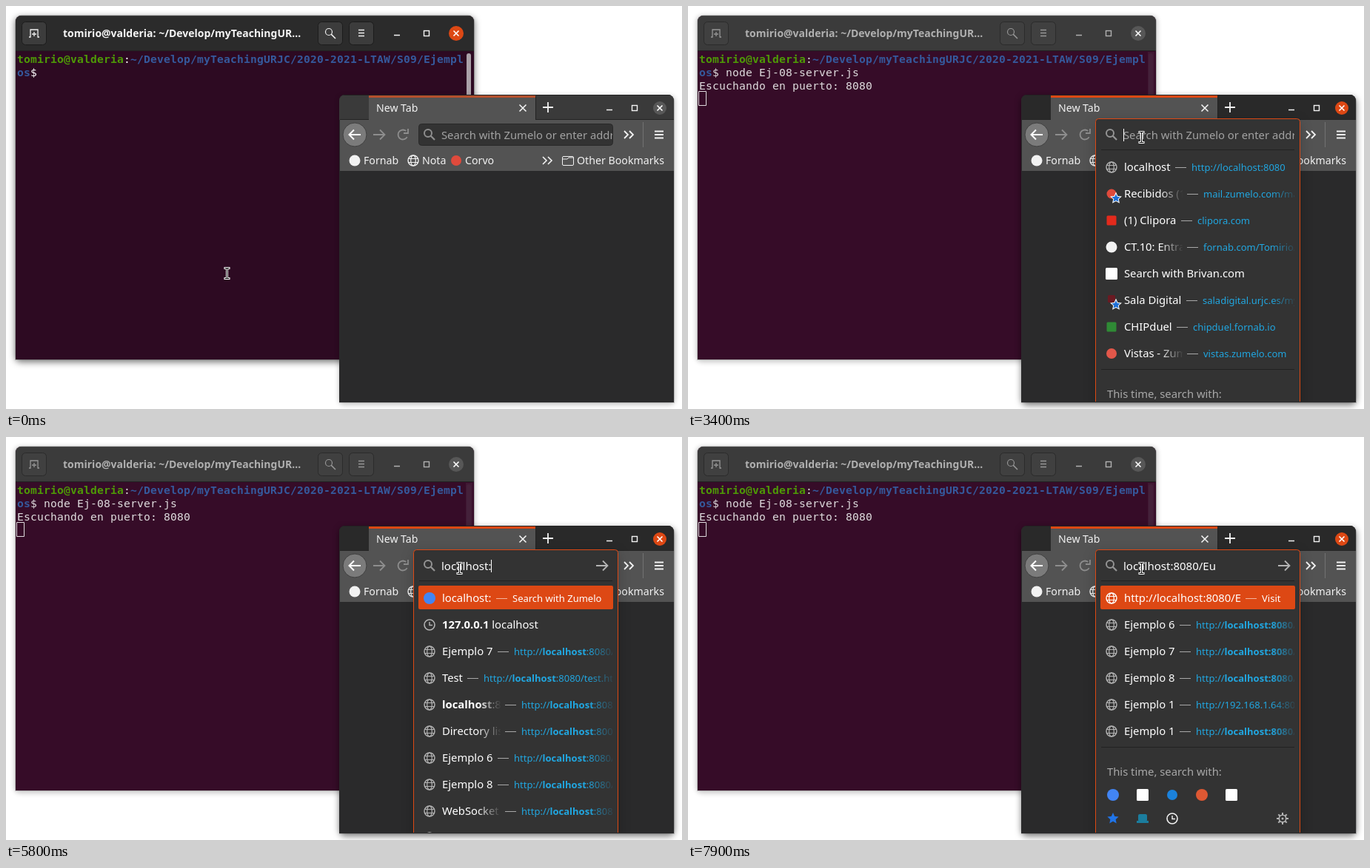
Recreate the animation shown at these times as an HTML page with a canvas. Size 913 by 545 pixels, loop 8000 ms.

```html
<!DOCTYPE html>
<html lang="en">
<head>
<meta charset="utf-8">
<title>Local server demo</title>
<style>
html, body { margin: 0; width: 100%; height: 100%; overflow: hidden; background: #fff; }
canvas { display: block; width: 913px; height: 545px; }
</style>
</head>
<body>
<canvas id="stage" width="913" height="545"></canvas>
<script>
const ctx = document.getElementById('stage').getContext('2d');
const LOOP = 8000, TAU = Math.PI * 2;
const ORANGE = '#dd4814', PANEL = '#333333', GREY = '#a8a8a8', BLUE = '#20a6e0';
const SANS = '"Noto Sans", "Open Sans", sans-serif';
const MONO = '"DejaVu Sans Mono", monospace';

// Last entry of a [time, ...] list that has started
const at = (list, t) => list.filter(e => e[0] <= t).pop();

function mix(a, b, k) {
  const ch = (c, i) => parseInt(c.substr(1 + 2 * i, 2), 16);
  return '#' + [0, 1, 2].map(i =>
    Math.round(ch(a, i) + (ch(b, i) - ch(a, i)) * k).toString(16).padStart(2, '0')).join('');
}

// ---------- script ----------
const TYPED = [[0, ''], [4000, 'l'], [4200, 'lo'], [4300, 'loc'], [4500, 'loca'], [4600, 'local'],
  [4700, 'localh'], [4800, 'localho'], [5200, 'localhos'], [5300, 'localhost'], [5700, 'localhost:'],
  [6100, 'localhost:8'], [6200, 'localhost:80'], [6600, 'localhost:808'], [6700, 'localhost:8080'],
  [6800, 'localhost:8080/'], [7400, 'localhost:8080/E'], [7900, 'localhost:8080/Eu']];

const HOST = 'http://localhost:8080/';
const TOP = ['globe|localhost|http://localhost:8080', 'mail|Recibidos (12)|mail.zumelo.com/mail',
  'video|(1) Clipora|clipora.com', 'code|CT.10: Entrada|fornab.com/Tomirio/CT',
  'shop|Search with Brivan.com', 'school|Sala Digital|saladigital.urjc.es/my',
  'chip|CHIPduel|chipduel.fornab.io', 'photo|Vistas - Zumelo|vistas.zumelo.com'];
const LOCAL = ['clock|127.0.0.1 localhost', 'find|localizador pedidos',
  'find|localidades confinadas en madrid', 'find|localizar movil', 'find|localidad',
  'find|locales en alquiler madrid', 'globe|Ejemplo 7|' + HOST + 'Ejemplo',
  'globe|Test|' + HOST + 'test.html', 'globe|Ejemplo 6|' + HOST];
const VISITED = ['clock|127.0.0.1 localhost', 'globe|Ejemplo 7|' + HOST + 'E',
  'globe|Test|' + HOST + 'test.html', 'globe|localhost:8080|' + HOST,
  'globe|Directory listing|http://localhost:8000/', 'globe|Ejemplo 6|' + HOST + 'E',
  'globe|Ejemplo 8|' + HOST + 'E', 'globe|WebSocket test|' + HOST, 'globe|Ejemplo 1|' + HOST];
const finds = words => words.split(',').map(w => 'find|localhost ' + w)
  .concat('globe|localhost:8080|' + HOST, 'globe|Test|' + HOST + 'test.html', 'globe|Ejemplo 7|' + HOST);
const EXAMPLES = [6, 7, 8].map(n => `globe|Ejemplo ${n}|${HOST}E`)
  .concat('globe|Ejemplo 1|http://192.168.1.64:8080/', `globe|Ejemplo 1|${HOST}E`);

const ROWS = [[0, TOP], [4100, LOCAL], [5300, VISITED],
  [6300, finds('3000,8080,phpmyadmin,ip,que es,xampp')],
  [7000, finds('8080,3000,phpmyadmin,xampp,ip,que es')], [7500, EXAMPLES]];
const FIRST = [[4100, 'globe|localhost:8080|Visit'], [5800, 'engine|localhost:|Search with Zumelo'],
  [6300, 'globe|http://localhost/|Visit'], [6600, 'globe|http://localhost:80/|Visit'],
  [6800, 'globe|http://localhost:8080/|Visit'], [7500, 'globe|http://localhost:8080/E|Visit']];

const POINTER = [[0, 298.5, 361.5, 'beam'], [500, 0, 0, ''], [2100, 375, 368, 'beam'],
  [2200, 437, 362, 'beam'], [2400, 540, 290, 'arrow'], [2500, 598, 215, 'arrow'], [2600, 612.5, 177.5, 'beam']];

// ---------- drawing helpers ----------
function font(size, bold, family = SANS) {
  ctx.font = `${bold ? 'bold ' : ''}${size}px ${family}`;
}
function text(s, x, y, color, size, bold) {
  font(size, bold);
  ctx.fillStyle = color;
  ctx.fillText(s, x, y);
}
function rich(parts, x, y, color, size) {
  for (const [s, bold] of parts) {
    text(s, x, y, color, size, bold);
    x += ctx.measureText(s).width;
  }
}
function widthOf(parts, size) {
  return parts.reduce((w, [s, bold]) => (font(size, bold), w + ctx.measureText(s).width), 0);
}
function fade(color, x0, x1) {
  const g = ctx.createLinearGradient(x0, 0, x1, 0);
  g.addColorStop(0, color);
  g.addColorStop(1, color + '00');
  return g;
}
function rect(x, y, w, h, color) {
  ctx.fillStyle = color;
  ctx.fillRect(x, y, w, h);
}
function round(x, y, w, h, r, fill, stroke) {
  ctx.beginPath();
  ctx.roundRect(x, y, w, h, r);
  if (fill) { ctx.fillStyle = fill; ctx.fill(); }
  if (stroke) { ctx.strokeStyle = stroke; ctx.lineWidth = 1; ctx.stroke(); }
}
function disc(x, y, r, color) {
  ctx.fillStyle = color;
  ctx.beginPath();
  ctx.arc(x, y, r, 0, TAU);
  ctx.fill();
}
function ring(x, y, r, color, width = 1.5, a = 0, b = TAU) {
  ctx.strokeStyle = color;
  ctx.lineWidth = width;
  ctx.beginPath();
  ctx.arc(x, y, r, a, b);
  ctx.stroke();
}
// Polylines around (x, y): "dx,dy dx,dy; ..."
function lines(x, y, spec, color, width = 1.5) {
  ctx.strokeStyle = color;
  ctx.lineWidth = width;
  ctx.beginPath();
  for (const run of spec.split(';')) {
    run.trim().split(' ').forEach((p, i) => {
      const [dx, dy] = p.split(',').map(Number);
      i ? ctx.lineTo(x + dx, y + dy) : ctx.moveTo(x + dx, y + dy);
    });
  }
  ctx.stroke();
}
function clipTo(x, y, w, h, draw, r = 0) {
  ctx.save();
  ctx.beginPath();
  ctx.roundRect(x, y, w, h, r);
  ctx.clip();
  draw();
  ctx.restore();
}
function shadow(x, y, w, h, r, drop, blur, spread, alpha) {
  ctx.save();
  ctx.shadowColor = `rgba(0,0,0,${alpha})`;
  ctx.shadowBlur = blur;
  ctx.shadowOffsetY = drop;
  // The casting shape sits off stage, so only its shadow shows
  ctx.shadowOffsetX = 2000;
  round(x - spread - 2000, y - spread, w + 2 * spread, h + 2 * spread, r, '#000');
  ctx.restore();
}
// Desktop window shadow; focus runs from 0 to 1
function windowShadow(x, y, w, h, focus) {
  shadow(x, y, w, h, 8, 3, 9, 1, 0.5 * focus);
  shadow(x, y, w, h, 8, 2, 6, 2, 0.2 * (1 - focus));
  round(x - 1, y - 1, w + 2, h + 2, [9, 9, 0, 0], 'rgba(0,0,0,0.18)');
}

// ---------- icons ----------
function globe(x, y, color) {
  ring(x, y, 7, color, 1.4);
  ctx.lineWidth = 1.2;
  ctx.beginPath();
  ctx.ellipse(x, y, 3.3, 7, 0, 0, TAU);
  ctx.stroke();
  lines(x, y, '-6.5,-2.5 6.5,-2.5; -6.5,2.5 6.5,2.5', color, 1.2);
}
function lens(x, y, color, r = 5, width = 2) {
  ring(x - 2, y - 2, r, color, width);
  const d = r * 0.7 - 2;
  lines(x, y, `${d},${d} 7,7`, color, width + 0.3);
}
function clock(x, y, color) {
  ring(x, y, 7, color, 1.6);
  lines(x, y, '0,-4 0,0.5 4,0.5', color, 1.4);
}
function star(x, y, r, fill, edge) {
  ctx.beginPath();
  for (let i = 0; i < 10; i++) {
    const a = i * TAU / 10 - TAU / 4, q = i % 2 ? r * 0.48 : r;
    ctx.lineTo(x + q * Math.cos(a), y + q * Math.sin(a));
  }
  ctx.closePath();
  if (edge) { ctx.strokeStyle = edge; ctx.lineWidth = 2; ctx.stroke(); }
  ctx.fillStyle = fill;
  ctx.fill();
}
function gear(x, y, color) {
  for (let i = 0; i < 8; i++) {
    const c = Math.cos(i * TAU / 8), s = Math.sin(i * TAU / 8);
    lines(x, y, `${5 * c},${5 * s} ${8 * c},${8 * s}`, color, 2);
  }
  ring(x, y, 4.7, color, 1.6);
  disc(x, y, 1.5, color);
}
const square = (x, y, r, c) => round(x - r, y - r, 2 * r, 2 * r, 1.5, c);
const ICONS = {
  globe, clock, find: lens,
  mail(x, y) { disc(x, y, 6.5, '#df4a3c'); star(x + 6, y + 6, 6, '#1f6fd6', '#ffffff'); },
  video: (x, y) => square(x, y, 6.5, '#e32a1c'),
  code: (x, y) => disc(x, y, 7.5, '#f2f2f2'),
  shop: (x, y) => square(x, y, 8, '#ffffff'),
  school(x, y) { square(x, y - 2, 5, '#6a1a22'); star(x + 6, y + 6, 6, '#1f6fd6', '#ffffff'); },
  chip: (x, y) => square(x, y, 6.5, '#2f8a35'),
  photo: (x, y) => disc(x, y, 7, '#e2574a'),
  engine: (x, y) => disc(x, y, 8, '#4285f4')
};

const CROSS = '-3.5,-3.5 3.5,3.5; 3.5,-3.5 -3.5,3.5';
const BARS = '-6,-4.5 6,-4.5; -6,0 6,0; -6,4.5 6,4.5';
const RIGHT = '-8,0 7,0; 1,-6.5 7.5,0 1,6.5';
const MORE = '-6,-5 -1,0 -6,5; 1,-5 6,0 1,5';

function windowButtons(x, y, gap, color, closeFill, r) {
  lines(x, y, '-4,2.5 4,2.5', color);
  ctx.strokeStyle = color;
  ctx.lineWidth = 1.4;
  ctx.strokeRect(x + gap - 3.5, y - 3.5, 7, 7);
  disc(x + 2 * gap, y, r, closeFill);
  lines(x + 2 * gap, y, CROSS, '#ffffff', 1.6);
}

// ---------- terminal ----------
function mono(s, col, line, color, bold) {
  font(14.67, bold, MONO);
  ctx.letterSpacing = (9 - ctx.measureText('M').width) + 'px';
  ctx.fillStyle = color;
  ctx.fillText(s, 15 + col * 9, 77 + line * 18);
  ctx.letterSpacing = '0px';
}

function terminal(t, k) {
  windowShadow(13, 13, 619, 465, 1 - k);
  clipTo(13, 13, 619, 465, () => {
    rect(13, 13, 619, 465, mix('#2d0a22', '#360c28', k));
    rect(13, 13, 619, 48, mix('#2b2b2b', '#3b3b3b', k));
    rect(13, 13, 619, 1, mix('#3c3c3c', '#484848', k));
    rect(13, 60, 619, 1, '#222222');
  }, [8, 8, 0, 0]);

  const ink = mix('#f5f5f5', '#b0b0b0', k), glyph = mix('#f0f0f0', '#969696', k);
  for (const x of [21, 421, 463])
    round(x + 0.5, 21.5, 33, 31, 5, mix('#3c3c3c', '#404040', k), mix('#1c1c1c', '#2b2b2b', k));
  lines(38, 37, '-7,5 -5,5 -5,-5 5,-5 5,5 7,5; 0,-2 0,4; -3,1 3,1', glyph, 1.3);
  lens(438, 37, glyph, 4.5, 1.2);
  lines(480, 36.5, '-4,-4 4,-4; -4,0 4,0; -4,4 4,4', glyph, 1.4);
  text('tomirio@valderia: ~/Develop/myTeachingUR...', 77, 42, ink, 14, true);
  windowButtons(528, 37, 40, ink, mix(ORANGE, '#575757', k), 10);

  rect(621, 62, 9, 415, `rgba(255,255,255,${0.05 * k})`);
  round(622, 64, 6, 200, 3, mix('#aaa1a8', '#44213a', k));

  const white = mix('#ffffff', '#dedbdd', k), blue = '#35599c';
  mono('tomirio@valderia', 0, 0, '#4e9a06', true);
  mono(':', 16, 0, white);
  mono('~/Develop/myTeachingURJC/2020-2021-LTAW/S09/Ejempl', 17, 0, blue, true);
  mono('os', 0, 1, blue, true);
  mono('$', 2, 1, white);
  if (t >= 800) mono('node Ej-08-server.js', 4, 1, white);
  if (t >= 1600) mono('Escuchando en puerto: 8080', 0, 2, white);

  const [, col, line] = at([[0, -1, 0], [400, 4, 1], [800, 25, 1], [1300, 0, 2], [1600, 0, 3],
    [2000, -1, 0], [2500, 0, 3]], t);
  if (col >= 0) {
    const x = 15 + col * 9, y = 62 + line * 18;
    if (t < 2900) rect(x, y, 9, 18, white);
    else round(x - 0.5, y - 0.5, 10, 19, 0, null, white);
  }
}

// ---------- browser ----------
function browser(t, k) {
  windowShadow(451, 121, 451, 415, k);
  const bar = mix('#3a3a3a', '#292929', k);
  clipTo(450, 120, 452, 416, () => {
    rect(450, 120, 452, 416, '#2a2a2b');
    rect(450, 120, 452, 34, bar);
    rect(450, 120, 452, 1, '#222222');
    rect(451, 153, 451, 1, '#242424');
    rect(451, 154, 451, 69, '#535353');
    rect(490, 121, 225, 33, '#535353');
    rect(490, 121, 225, 3, mix('#b5502d', ORANGE, k));
    rect(715, 122, 1, 31, '#222222');
  }, [8, 8, 0, 0]);

  const white = '#f2f2f2', dim = '#8e8e8e';
  text('New Tab', 500, 143, white, 14.1);
  lines(698, 138, '-4.5,-4.5 4.5,4.5; 4.5,-4.5 -4.5,4.5', white, 1.6);
  lines(732, 137, '-7,0 7,0; 0,-7 0,7', white, 1.8);
  windowButtons(815, 138, 34, white, mix('#585858', ORANGE, k), 9);

  disc(471, 174, 16, '#7b7b7b');
  ring(471, 174, 16, '#404040', 1);
  lines(471, 174, '8,0 -7,0; -1,-6.5 -7.5,0 -1,6.5', '#ffffff', 2);
  lines(504, 174, RIGHT, dim, 1.8);
  ring(536, 174, 6.5, dim, 1.8, 0.5, 5.4);
  lines(541, 171, '2,-5 2,1 -4,1', dim, 1.8);
  round(557.5, 159.5, 262, 29, 4, PANEL, t >= 2600 ? '#777777' : '#292929');
  lines(841, 174, MORE, white, 1.8);
  rect(860, 157, 1, 34, '#727272');
  lines(882, 174, BARS, white, 1.8);

  disc(471, 209, 7.5, '#f2f2f2');
  text('Fornab', 483, 214, white, 14.2);
  globe(550, 209, white);
  text('Nota', 562, 214, white, 14.2);
  disc(608, 209, 7, '#df4a3c');
  text('Corvo', 620, 214, white, 14.2);
  lines(731, 209, MORE, white, 1.6);
  round(751.5, 203.5, 15, 12, 1.5, null, white);
  lines(751, 203, '1,4 7,4 9,2 15,2', white, 1);
  text('Other Bookmarks', 771, 214, white, 14.2);

  if (t >= 3000) clipTo(451, 121, 451, 414, () => popup(t));
  else {
    lens(572, 174, dim);
    placeholder();
  }
}

const placeholder = () => clipTo(558, 160, 261, 28, () =>
  text('Search with Zumelo or enter address', 588, 180, '#a2a2a2', 14.8));

function popup(t) {
  const typed = at(TYPED, t)[1];
  const filled = typed && typed.length < 10;
  const height = t < 3100 ? 42 : 420;
  shadow(550, 152, 277, height, 4, 5, 18, 0, 0.2);
  round(550.5, 152.5, 276, height, 4, PANEL, ORANGE);
  lens(572, 174, '#949494');

  if (!typed) {
    placeholder();
    rect(588, 166, 1, 17, '#ffffff');
  } else {
    font(15);
    const x = 588 + ctx.measureText(typed).width;
    if (filled) {
      const rest = 'localhost:8080/'.slice(typed.length);
      rect(x, 165, ctx.measureText(rest).width, 18, ORANGE);
      text(rest, x, 180, '#ffffff', 15);
    } else if (t < 7900) rect(Math.round(x), 166, 1, 17, '#ffffff');
    text(typed, 588, 180, '#ffffff', 15);
    lines(805, 174, RIGHT, '#b4b4b4', 1.8);
  }
  if (t < 3100) return;

  rect(558, 194, 261, 1, '#222222');
  const key = typed.replace(/(:|\/\w*)$/, '');
  const first = at(FIRST, t);
  const rows = (first ? [first[1]] : []).concat(at(ROWS, t)[1]);
  rows.forEach((spec, i) => row(spec, 218 + 36 * i, key, first && i === 0, filled));
  if (rows.length < 9) engines(202 + 36 * rows.length);
}

// Splits s around key; "invert" makes everything but the key bold
function split(s, key, invert) {
  const i = s.indexOf(key);
  if (!key || i < 0) return [[s, invert]];
  return [[s.slice(0, i), invert], [key, !invert], [s.slice(i + key.length), invert]];
}

function row(spec, y, key, picked, filled) {
  const [icon, title, sub] = spec.split('|');
  if (picked) round(557, y - 17, 263, 32, 2, ORANGE);
  ICONS[icon](572, y, picked ? '#ffffff' : '#b4b4b4');
  const invert = icon === 'find' || icon === 'clock';
  const parts = split(title, picked && !filled ? '' : key, invert);
  const full = widthOf(parts, 14.8);
  const w = sub && !picked ? Math.min(full, 78) : full;
  const ink = '#ffffff';
  clipTo(589, y - 15, Math.min(w + 1, 230), 30, () =>
    rich(parts, 589, y + 5, w < full ? fade(ink, 637, 669) : ink, 14.8));
  if (!sub) return;

  const x = Math.round(589 + w + 6.5);
  rect(x, y, 15, 1, picked ? '#f3b49d' : GREY);
  const link = split(sub, picked ? '' : key, false);
  const color = picked ? '#ffffff' : BLUE;
  const long = x + 22 + widthOf(link, 13) > 819;
  clipTo(x, y - 15, 819 - x, 30, () =>
    rich(link, x + 22, y + 5, long ? fade(color, 788, 824) : color, 13));
}

function engines(y) {
  rect(558, y + 1, 261, 1, '#222222');
  text('This time, search with:', 566, y + 40, GREY, 14.8);
  y += 66;
  disc(574, y, 8, '#4285f4');
  square(614, y, 8, '#ffffff');
  disc(654, y, 7, '#1b82dc');
  disc(694, y, 8, '#de5833');
  square(734, y, 8, '#ffffff');
  y += 32;
  star(574, y, 8, '#2074e8');
  round(608, y - 6, 12, 10, 2, '#1b7d9e');
  rect(606, y + 3, 16, 3, '#1b7d9e');
  clock(654, y, '#f2f2f2');
  gear(803, y, '#b4b4b4');
}

// ---------- pointer ----------
function pointer(t) {
  const [, x, y, kind] = at(POINTER, t);
  if (kind === 'beam') {
    const shape = '-2.5,-7 2.5,-7; 0,-7 0,7; -2.5,7 2.5,7';
    ctx.lineCap = 'square';
    lines(x, y, shape, '#ffffff', 3);
    lines(x, y, shape, '#000000', 1);
    ctx.lineCap = 'butt';
  } else if (kind === 'arrow') {
    lines(x, y, '0,0 0,16 4,12 7,18 9,17 6.5,11.5 11,11 0,0', '#ffffff', 2);
    ctx.fillStyle = '#111111';
    ctx.fill();
  }
}

function draw(now) {
  const t = Math.floor((now % LOOP) / 100) * 100;
  const k = Math.min(1, Math.max(0, (t - 2800) / 200));
  rect(0, 0, 913, 545, '#ffffff');
  terminal(t, k);
  browser(t, k);
  pointer(t);
}

let start;
function tick(now) {
  start ??= now;
  draw(Math.max(0, now - start));
  requestAnimationFrame(tick);
}
draw(0);
requestAnimationFrame(tick);
</script>
</body>
</html>
```
